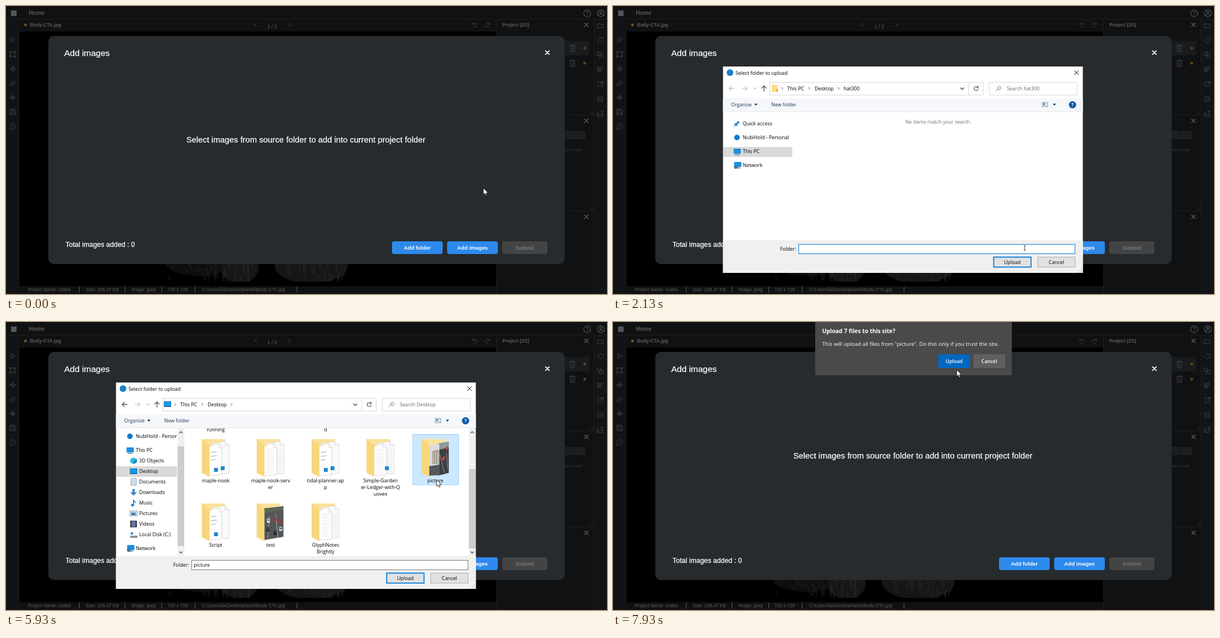
An HTML page that plays this animation: 1079x519 px, repeating every 8000 ms.

```html
<!DOCTYPE html>
<html lang="en">
<head>
<meta charset="utf-8">
<title>Add images</title>
<style>
html, body { margin: 0; width: 100%; height: 100%; overflow: hidden; background: #0e0f10; }
svg { display: block; }
#stage { width: 100vw; height: 100vh; font-family: "Liberation Sans", Arial, sans-serif; cursor: default; }
.ui { font-family: "Open Sans", "Noto Sans", sans-serif; font-size: 8.9px; }
.mid { text-anchor: middle; }
.line { fill: none; stroke-linecap: round; stroke-linejoin: round; }
</style>
</head>
<body>
<svg id="stage" viewBox="0 0 1079 519"></svg>
<script>
const $ = id => document.getElementById(id);
const T = (x, y, s, attrs = '') => `<text x="${x}" y="${y}" ${attrs}>${s}</text>`;
const R = (x, y, w, h, fill, attrs = '') => `<rect x="${x}" y="${y}" width="${w}" height="${h}" fill="${fill}" ${attrs}/>`;
const C = (x, y, r, fill, attrs = '') => `<circle cx="${x}" cy="${y}" r="${r}" fill="${fill}" ${attrs}/>`;
const F = (d, fill, attrs = '') => `<path d="${d}" fill="${fill}" ${attrs}/>`;
const L = (d, stroke, width = 1, attrs = '') => `<path class="line" d="${d}" stroke="${stroke}" stroke-width="${width}" ${attrs}/>`;
const G = (id, body, attrs = '') => `<g id="${id}" ${attrs}>${body}</g>`;
const at = (x, y, body) => `<g transform="translate(${x} ${y})">${body}</g>`;
const cross = (x, y, r, color, width) => L(`M${x - r} ${y - r}l${2 * r} ${2 * r}m0 ${-2 * r}l${-2 * r} ${2 * r}`, color, width);
const clip = (x, y, w, h, body) => `<svg x="${x}" y="${y}" width="${w}" height="${h}" viewBox="${x} ${y} ${w} ${h}">${body}</svg>`;

// Dimmed application behind the modal
const dim = '#404142';
const icon = (x, y, d) => at(x, y, L(d, dim, 1));
const box = 'M-4-4h8v8h-8z';

// Lower edge of a dark grey scan: soft masses with seeded streaks
function scan() {
  let seed = 7;
  const random = () => (seed = seed * 16807 % 2147483647) / 2147483647;
  const mass = (x, y, rx, ry, fill) => `<ellipse cx="${x}" cy="${y}" rx="${rx}" ry="${ry}" fill="${fill}"/>`;
  const streaks = (count, left, width, lean, color) => L(Array.from({ length: count }, () =>
    `M${left + random() * width} ${455 + random() * 32}q${lean} 5 ${lean * 2 * random()} ${6 + random() * 14}`).join(''), color, 1.4);
  return clip(24, 46, 856, 451, `<g filter="url(#soft)">
    ${mass(345, 462, 60, 24, '#101010')}${mass(420, 470, 34, 30, '#131313')}${mass(548, 468, 66, 32, '#121212')}
    ${streaks(22, 290, 90, 6, '#1d1d1d')}${streaks(18, 385, 55, 2, '#2c2c2c')}${streaks(40, 485, 125, -2, '#262626')}</g>`);
}

function trash(x, y) {
  return icon(x, y, 'M-5-4h10M-2-4v-2h4v2M-4-4v10h8v-10M-1.5-1v5M1.5-1v5') + C(x + 22, y, 2.5, '#664218');
}

function app() {
  const status = [[39, 'Project Name: crates'], [143, 'Size: 108.47 KB'], [225, 'Image: jpeg'], [290, '720 x 729'],
    [352, 'C:\\Users\\lia\\Desktop\\work\\Body-CTA.jpg']];
  const left = ['M-3-4v8l7-4z', 'M-4-4h8v8h-8zM-5-5h2v2h-2zM3-5h2v2h-2zM-5 3h2v2h-2zM3 3h2v2h-2z',
    'M-5 0h10M0-5v10M-2-3l2-2 2 2M-2 3l2 2 2-2M-3-2l-2 2 2 2M3-2l2 2-2 2', 'M-5 2l6-6q3 0 4 3l-6 6q-4 0-4-3zM-2-1l4 4',
    'M-5 0h10M0-5v10M-3 0a3 3 0 1 0 6 0a3 3 0 1 0-6 0', 'M-5-5h8l2 2v8h-10zM-3-5v3h5v-3M-3 5v-4h6v4',
    'M-5 0a5 5 0 1 1 5 5h-5zM0-2v4'];
  const right = ['M-5-3h4l1 1h5v6h-10z', 'M-5 1l5-5h5v4l-5 5z', 'M-5-5h6v6h-6zM-1-1h6v6h-6z', 'M-5-5v10M-3-4h7v3h-7zM-3 1h4v3h-4z',
    box + 'M0 0l5-5M2-5h3v3', box + 'M-4 2l3-3 2 2 2-2 1 1', 'M-5-3v8h9v-6M-5 4l3-4 2 2 2-2 2 3M3-6v4M1-4h4'];
  return R(0, 0, 1079, 519, '#101112') + R(0, 24, 24, 495, '#121314') + R(24, 46, 856, 459, '#000') +
    R(1055, 24, 24, 495, '#131415') + scan() +
    L('M0 23.5H1079M880.5 24V519M1055.5 24V519M881 196.5H1055M881 369.5H1055', '#1d1e1f') +
    R(9, 8, 10, 10, '#555556') +
    T(41, 16, 'Home', 'font-size="10.1" font-weight="700" fill="#59595a"') +
    C(35, 34, 2.6, '#754a1c') +
    `<g font-size="8.5" font-weight="700" fill="#5b5c5d">${T(43, 37, 'Body-CTA.jpg')}${T(891, 37, 'Project (2/2)')}</g>` +
    T(478, 40, '1 / 2', 'class="mid" font-size="9" fill="#626364"') +
    L('M450 31l-4 3 4 3M507 31l4 3-4 3', dim) +
    icon(842, 34, 'M-4-4v3h3M-4-1q4-4 7 0q2 4-3 5h-2') + icon(864, 34, 'M4-4v3h-3M4-1q-4-4-7 0q-2 4 3 5h2') +
    [1043.5, 1068].map(x => C(x, 13, 6.3, 'none', 'stroke="#58595a" stroke-width="1.1"')).join('') +
    L('M1064 17q4-5 8 0M1066 11a2 2 0 1 1 4 0a2 2 0 1 1-4 0', '#58595a', 1.1) +
    T(1043.5, 16.5, '?', 'class="mid" font-size="10" fill="#58595a"') +
    left.map((d, i) => icon(12, 61 + i * 26, d)).join('') + right.map((d, i) => icon(1067, 35 + i * 26.5, d)).join('') +
    R(1000, 63, 47, 26, '#1a1b1c') + trash(1017, 76) + trash(1017, 103) +
    [34, 207, 380].map(y => cross(1042, y, 3, '#6a6b6c', 1.4)).join('') +
    R(990, 225, 50, 15, '#1d1e1f', 'rx="2"') + L('M1019.5 225v15', '#101112') +
    T(1035, 262, 'folder to add', 'text-anchor="end" font-size="7.5" fill="#343536"') +
    L('M1049 195l5-5M1052 195l2-2M1049 368l5-5M1052 368l2-2', '#333') +
    `<g font-size="8.3" fill="#5b5c5d">${status.map(([x, s]) => T(x, 514, s)).join('')}</g>` +
    L('M131.5 506v10M213.5 506v10M279.5 506v10M339.5 506v10M522.5 506v10', '#5b5c5d');
}

function modal() {
  const button = (x, w, s, fill, color) => R(x, 424, w, 23, fill, 'rx="4"') +
    T(x + w / 2, 439, s, `class="mid" font-size="9.7" font-weight="700" fill="${color}"`);
  return R(76, 54, 927, 411, '#272b2e', 'rx="10"') +
    `<g fill="#fff" stroke="#fff" stroke-width=".25">${T(104.5, 90, 'Add images', 'font-size="15.5"')}
    ${T(538.3, 245.5, 'Select images from source folder to add into current project folder', 'class="mid" font-size="14.8"')}
    ${T(106.8, 434, 'Total images added : 0', 'font-size="12.4"')}</g>` +
    cross(972, 84, 3.2, '#fff', 1.9) + button(693, 91, 'Add folder', '#2d89eb', '#fff') +
    button(792, 91, 'Add images', '#2d89eb', '#fff') + button(891, 81, 'Submit', '#434445', '#77797a');
}

// Folder dialog
const blue = '#0078d7';
const monitor = R(-6, -5, 13, 9, '#1c8fdd') + R(-4, 5, 9, 1.4, '#547184');
const glyphs = {
  star: F('M-5 0l4-1 3-4 3 3-4 3-1 4-2-2-4 3 2-4z', '#2b84c9'),
  cloud: C(0, 0, 5, '#1479cf'),
  pc: monitor,
  cube: F('M0-6l6 3v6l-6 3-6-3v-6z', '#35bde0') + F('M0 0l6-3v6l-6 3z', '#1690bd'),
  desktop: R(-6.5, -5, 13, 10, '#0a6dbd') + R(-5.5, -4, 11, 7, '#179be8'),
  page: R(-4.5, -6, 9, 12, '#fff', 'stroke="#7c8b98"') + L('M-2.5-3h5M-2.5 0h5M-2.5 3h5', '#5595c7'),
  down: F('M-2-6h4v6h4l-6 6-6-6h4z', '#3a86d0'),
  note: L('M0 4v-9q1 3 4 4', '#1686d2', 1.8) + C(-2, 4, 2.5, '#1686d2'),
  frame: R(-6.5, -4.5, 13, 9, '#fff', 'stroke="#8b98a3"') + R(-5, -3, 10, 6, '#76b8e2') + F('M-5 3l4-4 6 4z', '#345f78'),
  film: R(-6, -6, 12, 12, '#363a44') + R(-3.5, -5, 7, 10, '#6478a8'),
  disk: R(-6, 2, 13, 4, '#8b949b') + R(-5, -4, 4, 4, '#1c8fdd'),
  net: at(1, -1, monitor) + C(-2, 3, 3.4, '#3a7ca6')
};
const navItem = ([name, label, y, deep]) => at(deep ? 229 : 222.5, y, glyphs[name]) + T(deep ? 239 : 233, y + 3.2, label);

const sheets = F('M18 8l24-4 7 7v51l-31 2z', '#fafafa', 'stroke="#d4d4d4" stroke-width=".8"') +
  F('M13 13l17-5 6 7v49l-23 2z', '#fff', 'stroke="#cfcfcf" stroke-width=".8"') +
  L('M30 8v8l6-1M42 4v8l7-1', '#d0d0d0', .8);
const textLines = L(Array.from({ length: 11 }, (_, i) => `M17 ${19 + i * 4}h14m4 0h11`).join(''), '#dedede', .8);
const bars = L('M17 24l9-1M17 31l10-1M17 38l7-1', '#b9c0c6', 1.3);
const mark = (x, y) => R(x, y, 7, 7, '#1f86cc');
const fillings = {
  plain: sheets + textLines,
  one: sheets + bars + mark(22, 52),
  side: sheets + textLines + mark(33, 49),
  two: sheets + bars + mark(22, 52) + mark(34, 49),
  city: F('M29 8l20-3v56l-20 5z', '#3d4145') + F('M29 8l20-3v10l-20 5z', '#8d9aa0') +
    F('M37 33l5-2v6l-5 2zM44 14l4-1v6l-4 1z', '#c24740') + L('M33 28l8 32M45 24l2 30', '#a9adac', .8) +
    F('M12 12l20-4v57l-20 1z', '#dcdddb') + F('M19 22l12-3v26h-12z', '#a2998d') +
    L('M21 24v20M25 23v21M29 22v22', '#e6e3dc', 1) + F('M12 49l20-3v19l-20 1z', '#54585a'),
  road: F('M13 9l35-4v55l-35 6z', '#54575a') + F('M13 9l35-4v7l-35 6z', '#5c6656') +
    L('M23 23l-3 38M34 19l4 42', '#bfc0be', .8) +
    [[18, 27, '#d9dadb'], [29, 25, '#a33'], [40, 29, '#c12f2b'], [17, 43, '#2c333b'], [30, 49, '#22262a'], [40, 42, '#b9bdc0']]
      .map(([x, y, fill]) => R(x, y, 6, 8, fill, 'rx="2"') + R(x + 1, y + 2, 4, 2, '#46525c')).join('')
};
const folder = (x, y, filling) => at(x, y, F('M0 0h42v60H8z', '#fbe29a') + fillings[filling] + F('M0 0l14 11v57l-14-7z', '#f7d77d'));
const tile = ([col, y, filling, ...lines]) => {
  const center = 376.5 + col * 98.6;
  return folder(center - 25, y, filling) + lines.map((s, i) => T(center, y + 78 + i * 11.8, s, 'class="mid"')).join('');
};
const tiles = [
  [0, 107, 'road', 'footage-of-', 'running'], [1, 107, 'plain', 'archive'], [2, 107, 'two', 'calendar-boar', 'd'],
  [3, 107, 'plain', 'invoices'], [4, 107, 'one', 'lessons'],
  [0, 211, 'two', 'maple-nook'], [1, 211, 'plain', 'maple-nook-serv', 'er'], [2, 211, 'two', 'tidal-planner-ap', 'p'],
  [3, 211, 'side', 'Simple-Garden', 'er-Ledger-with-Q', 'uovex'], [4, 211, 'city', 'picture'],
  [0, 327, 'one', 'Script'], [1, 327, 'road', 'test'], [2, 327, 'plain', 'GlyphNotes', 'Brightly']
];

const scrollbar = (x, thumb) => R(x, 190, 12, 231, '#f0f0f0') + thumb +
  L(`M${x + 3.5} 200l2.5-2.5 2.5 2.5M${x + 3.5} 414l2.5 2.5 2.5-2.5`, '#505050', 1.3);

function dialog() {
  const button = (id, x, s, border, width) =>
    R(x + .5, 452.5, 67, 18, '#e1e1e1', `id="${id}" stroke="${border}" stroke-width="${width}"`) + T(x + 34, 465, s, 'class="mid"');
  return R(197.5, 109, 646, 372, '#fff') + R(197.5, 422, 646, 59, '#f0f0f0') +
    T(220, 124, 'Select folder to upload', 'id="title"') +
    G('titleIcons', C(210, 120, 6, '#1b7fc8') + cross(832, 120, 3.8, '#111', 1)) +
    R(281.5, 137.5, 383, 23, '#fff', 'stroke="#d9d9d9"') + L('M638.5 138v22', '#d9d9d9') +
    R(310, 138, 47, 22, '#e5f3fc', 'id="hoverPc"') + R(358, 138, 53, 22, '#e5f3fc', 'id="hoverDesktop"') +
    L('M271 153.5v-9M267 148l4-4 4 4', '#555', 1.4) + L('M624 147.5l3 3 3-3', '#444', 1.2) +
    L('M655 146.5a3.7 3.7 0 1 0 .7 3M655.5 144v3h-3', '#444', 1.1) +
    L('M303 146.5l2 2-2 2M351.5 146.5l2 2-2 2M404 146.5l2 2-2 2', '#555') +
    T(313, 151.5, 'This PC') + T(362, 151.5, 'Desktop') +
    G('emptyPath', R(285, 142, 10, 13, '#fbdc83') + F('M293 155v-6h3v6z', '#e9b93e') + T(414, 151.5, 'hat300')) +
    G('desktopPath', at(290, 148, glyphs.desktop)) +
    G('tools', L('M208.5 148.5h9M212.5 144.5l-4 4 4 4', '#c4c4c4', 1.3, 'id="back"') +
      L('M232 148.5h9M237 144.5l4 4-4 4', '#ccc', 1.3) + L('M253 147.5l2 2 2-2', '#888') +
      R(675.5, 137.5, 158, 23, '#fff', 'stroke="#d9d9d9"') +
      L('M691 147a2.6 2.6 0 1 1 5 1.2a2.6 2.6 0 1 1-5-1.2M691.5 149l-4 4', '#777') +
      T(707, 151.5, '', 'id="search" fill="#666"') + R(197.5, 166, 646, 24, '#f5f7fa') + L('M198 190.5H843', '#e6e9ee') +
      `<g fill="#1e395b">${T(212, 181, 'Organize')}${T(284, 181, 'New folder')}</g>` +
      F('M253.5 176h6l-3 3.5zM789.5 176h6l-3 3.5z', '#1e395b') +
      R(770.5, 173.5, 10, 8, '#fff', 'stroke="#8ea0b3"') + R(772, 175, 4, 3, '#2f7cc0') + L('M777.5 176h2M772 179.5h7', '#8ea0b3')) +
    C(825, 178, 6.5, '#0a5aa4') + T(825, 181.3, '?', 'class="mid" fill="#fff" font-weight="700"') +
    G('shortNav', R(198, 254, 124, 18, '#d9d9d9') + [['star', 'Quick access', 212], ['cloud', 'NubiHold - Personal', 237],
      ['pc', 'This PC', 262], ['net', 'Network', 287]].map(navItem).join('')) +
    G('fullNav', clip(198, 191, 109, 230, R(198, 260, 109, 19, '#d9d9d9') +
      [['cloud', 'NubiHold - Personal', 206], ['pc', 'This PC', 231], ['cube', '3D Objects', 250, 1], ['desktop', 'Desktop', 269, 1],
        ['page', 'Documents', 288, 1], ['down', 'Downloads', 307, 1], ['note', 'Music', 326, 1], ['frame', 'Pictures', 345, 1],
        ['film', 'Videos', 364, 1], ['disk', 'Local Disk (C:)', 383, 1], ['net', 'Network', 408]].map(navItem).join('')) +
      scrollbar(308, R(308, 224, 12, 180, '#cdcdcd'))) +
    T(584, 211.5, 'No items match your search.', 'id="empty" class="mid" fill="#6d6d6d"') +
    G('list', clip(321, 191, 510, 230, G('scroller', R(631, 202, 83, 116, '#e5f1fb', 'id="hoverTile"') +
      R(730.5, 202.5, 82, 91, '#e5f1fb', 'id="pick"') + tiles.map(tile).join(''))) +
      scrollbar(831, R(831, 265, 12, 143, '#cdcdcd', 'id="thumb"'))) +
    T(300, 441, 'Folder:') + R(333.5, 429.5, 496, 17, '#fff', 'id="field"') + R(336, 431.5, 36, 12, blue, 'id="selection"') +
    T(337, 441, '', 'id="value"') + R(338, 432, 1, 11, '#000', 'id="caret"') +
    button('upload', 683, 'Upload', blue, 1.8) + button('cancel', 762, 'Cancel', '#adadad', 1) +
    L('M841 474v0M841 477v0M838 477v0M841 480v0M838 480v0M835 480v0', '#aaa', 1.3);
}

function prompt() {
  const button = (x, s, fill) => R(x, 58, 57, 25, fill, 'rx="1.5"') + T(x + 28.5, 73.5, s, 'class="mid" font-weight="600"');
  return R(363, -4, 353, 100, '#4a4a4a', 'rx="3"') + `<g fill="#fff">
    ${T(375.5, 20, 'Upload 7 files to this site?', 'font-size="10.3" font-weight="700"')}
    ${T(375.5, 42.5, 'This will upload all files from "picture". Do this only if you trust the site.', 'font-size="9.7"')}
    ${button(584, 'Upload', '#0067c0')}${button(647, 'Cancel', '#5f5f5f')}</g>`;
}

const pointer = G('arrow', F('M0 0V12.2L2.8 9.6 4.7 13.8 6.6 13 4.8 8.9H8.8Z', '#fff', 'stroke="#000" stroke-width=".8"')) +
  G('ring', C(10, 8, 4.5, 'none', 'stroke="#2c9be8" stroke-width="2.4"')) +
  G('beam', L('M-1.5 0h3M0 0v8M-1.5 8h3', '#111', .8));

$('stage').innerHTML = '<defs><filter id="soft"><feGaussianBlur stdDeviation="1"/></filter></defs>' +
  app() + modal() + G('dialog', dialog(), 'class="ui"') + G('prompt', prompt(), 'class="ui"') + G('pointer', pointer);

// Timeline: time, x, y of the pointer tip
const path = [[0, 857, 328], [400, 857, 328], [933, 754, 435], [1267, 754, 435], [1600, 739, 432], [2400, 739, 432],
  [2800, 345, 164], [3067, 370, 153], [3333, 378, 150], [3533, 378, 150], [4333, 653, 302], [4800, 653, 302], [5533, 773, 284],
  [5933, 773, 284], [6333, 722, 449], [6400, 722, 449], [6667, 717, 463], [6867, 717, 463], [7267, 690, 364], [7933, 617, 86]];
const LOOP = 8000, STEP = 1000 / 15;
const clamp = v => Math.max(0, Math.min(1, v));
const show = (id, on) => { $(id).style.display = on ? '' : 'none'; };
const set = (id, name, value) => $(id).setAttribute(name, value);

function pointerAt(t) {
  const i = path.findIndex(([time]) => time > t);
  if (i < 0) return path.at(-1).slice(1);
  const [t0, x0, y0] = path[i - 1], [t1, x1, y1] = path[i];
  const u = (t - t0) / (t1 - t0), e = u * u * (3 - 2 * u);
  return [x0 + (x1 - x0) * e, y0 + (y1 - y0) * e];
}

// Opacity and scale of the dialog as it opens and closes
function dialogState(t) {
  if (t < 1990 || t > 6920) return [0, 1];
  if (t < 2060) return [.18, .958];
  if (t < 2125) return [.75, .99];
  if (t < 6725) return [1, 1];
  if (t < 6790) return [.85, .995];
  return t < 6860 ? [.56, .978] : [.15, .95];
}

function render(t) {
  const [x, y] = pointerAt(t), [opacity, scale] = dialogState(t);
  const inDesktop = t >= 3530, picked = t >= 5660, closing = t >= 6725, beam = t >= 1990 && t < 2400;
  set('pointer', 'transform', `translate(${x} ${y})`);
  show('arrow', !beam);
  show('beam', beam);
  show('ring', t >= 1795 && !beam && t < 2000);

  show('dialog', opacity > 0);
  set('dialog', 'opacity', opacity);
  set('dialog', 'transform', `translate(510 285) scale(${scale}) translate(-510 -285)`);
  show('titleIcons', !closing);
  set('title', 'x', closing ? 204 : 220);
  show('tools', t >= 2060);
  show('shortNav', t < 2400);
  show('fullNav', t >= 2400);
  show('hoverPc', t >= 2860 && t < 3130);
  show('hoverDesktop', t >= 3000 && !inDesktop);
  show('emptyPath', !inDesktop);
  show('desktopPath', inDesktop);
  show('empty', !inDesktop);
  show('list', inDesktop);
  set('back', 'stroke', inDesktop ? '#555' : '#c4c4c4');
  $('search').textContent = inDesktop ? 'Search Desktop' : 'Search hat300';

  const scroll = clamp((t - 4333) / 200);
  set('scroller', 'transform', `translate(0 ${97 * (1 - scroll)})`);
  set('thumb', 'y', 205 + 60 * scroll);
  show('hoverTile', inDesktop && t < 5500 && x > 631 && x < 714);
  show('pick', picked || (t > 4800 && x > 730));
  set('pick', 'fill', closing ? '#cfcfcf' : picked ? '#cce8ff' : '#e5f1fb');
  set('pick', 'stroke', picked && !closing ? '#99d1ff' : 'none');

  const selected = inDesktop && !picked, overUpload = t >= 6400;
  set('field', 'stroke', picked ? '#7a7a7a' : blue);
  show('selection', selected);
  $('value').textContent = picked ? 'picture' : inDesktop ? 'Desktop' : '';
  set('value', 'fill', selected ? '#fff' : '#000');
  show('caret', !picked && (t < 2100 || Math.floor((t - 2000) / 533) % 2 === 1));
  set('caret', 'x', inDesktop ? 372 : 338);
  set('upload', 'fill', overUpload ? '#d5e9f8' : '#e1e1e1');
  set('upload', 'stroke-width', overUpload ? 1 : 1.8);

  show('prompt', t >= 7060);
  set('prompt', 'opacity', clamp((t - 6990) / 200));
}

const start = performance.now();
function tick() {
  const t = (performance.now() - start) % LOOP;
  render(Math.floor((t + 4) / STEP) * STEP);
  requestAnimationFrame(tick);
}
tick();
</script>
</body>
</html>
```
